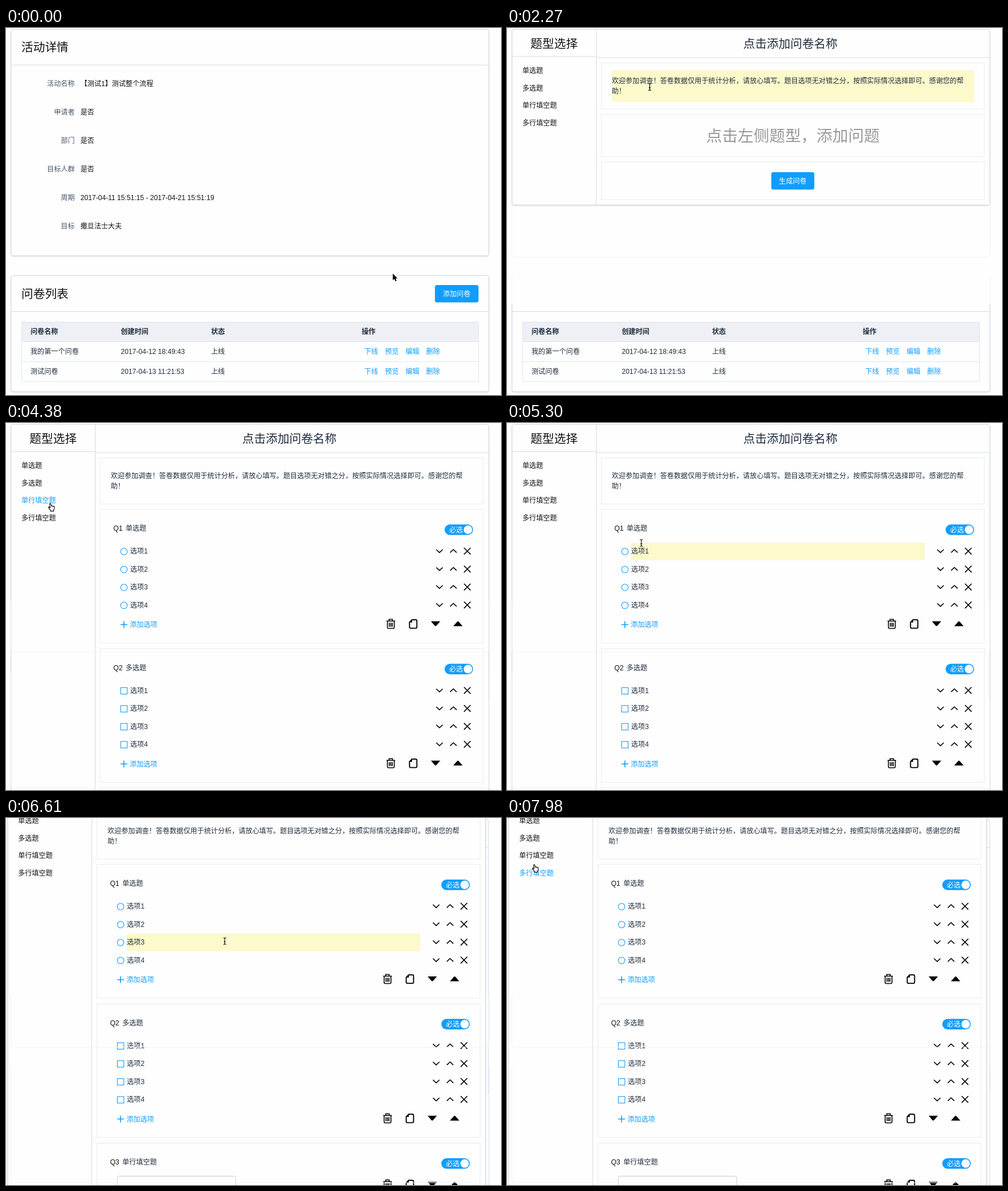
Animation of 869x644 px, one loop 8000 ms. Source, as an HTML page:

```html
<!DOCTYPE html>
<html lang="zh-CN">
<head>
<meta charset="utf-8">
<title>问卷编辑</title>
<style>
html, body { margin: 0; width: 100%; height: 100%; overflow: hidden; background: #fefefe; }
svg { display: block; width: 869px; height: 644px; }
text { font-family: "Liberation Sans", "Noto Sans CJK SC", "Noto Sans CJK", sans-serif; white-space: pre; }
.card { fill: #fefefe; stroke: #d1dbe5; filter: drop-shadow(0 1.5px 1.5px rgba(0,0,0,.14)); }
.line { fill: none; stroke: #d3dce6; }
.box { fill: none; stroke: #ececec; }
.ghost { fill: none; stroke: #f1f2f3; }
.ink { fill: none; stroke: #000; stroke-width: 1.6; }
.blue { fill: none; stroke: #109dff; stroke-width: 1.1; }
</style>
</head>
<body>
<svg id="stage" viewBox="0 0 869 644" xmlns="http://www.w3.org/2000/svg"></svg>
<script>
const LOOP = 8000, BLUE = '#109dff', DARK = '#1f2d3d', GREY = '#48576a', SMALL = 12.12, BIG = 20.7;
const QUESTION_STEP = 244.5, ROW_STEP = 31.5;

// y is the visual middle of the text
const text = (x, y, s, fill = DARK, size = SMALL, more = '') =>
  `<text x="${x}" y="${y + size * 0.37}" font-size="${size}" fill="${fill}" ${more}>${s}</text>`;
const middle = (x, y, s, fill, size) => text(x, y, s, fill, size, 'text-anchor="middle"');
const rect = (x, y, w, h, more) => `<rect x="${x}" y="${y}" width="${w}" height="${h}" ${more}/>`;
const path = (d, cls, more = '') => `<path d="${d}" class="${cls}" ${more}/>`;
const group = (id, body, more = '') => `<g id="${id}" ${more}>${body}</g>`;
const button = (id, x, y, w, label) =>
  rect(x, y, w, 30.5, `rx="3.5" fill="${BLUE}" id="${id}"`) + middle(x + w / 2, y + 15.5, label, '#fff');

function listPage() {
  const fields = [
    ['活动名称', '【测试1】测试整个流程'], ['申请者', '是否'], ['部门', '是否'], ['目标人群', '是否'],
    ['周期', '2017-04-11 15:51:15 - 2017-04-21 15:51:19'], ['目标', '撒旦法士大夫']
  ];
  const rows = [['我的第一个问卷', '2017-04-12 18:49:43'], ['测试问卷', '2017-04-13 11:21:53']];
  const columns = [43, 201.5, 360, 624.5];
  let s = rect(9, 2.5, 838.5, 397, 'rx="3.5" class="card"') + path('M9 65H847.5', 'line') +
    text(27, 33, '活动详情', '#111', BIG);
  fields.forEach(([name, value], i) => {
    const y = 98 + i * 49.9;
    s += text(120.5, y, name, GREY, SMALL, 'text-anchor="end"') + text(130.7, y, value, '#111');
  });
  s += rect(9, 434.5, 838.5, 203.5, 'rx="3.5" class="card"') + path('M9 497.5H847.5', 'line') +
    text(27, 466, '问卷列表', '#111', BIG) + button('add', 753, 451, 76.5, '添加问卷') +
    rect(27, 516, 802.5, 34.5, 'fill="#eef0f6"') +
    path('M27.5 516H829.5V620H27.5ZM27 550.5H829.5M27 585.5H829.5', 'line', 'style="stroke:#dfe6ec"');
  ['问卷名称', '创建时间', '状态', '操作'].forEach((h, i) => {
    s += text(columns[i], 533, h, DARK, SMALL, 'font-weight="bold"');
  });
  rows.forEach((row, i) => {
    const y = 567.5 + i * 35;
    [...row, '上线'].forEach((v, k) => { s += text(columns[k], y, v); });
    ['下线', '预览', '编辑', '删除'].forEach((v, k) => { s += text(629 + k * 36.2, y + 0.5, v, BLUE); });
  });
  return s;
}

const tools = y => `<g transform="translate(0 ${y})">` +
  path('M668 -5H683.2M672.5 -5V-8H678.5V-5M669.6 -5V6q0 2 2 2h8q2 0 2-2V-5M673 -2V5M675.6 -2V5M678.2 -2V5', 'ink') +
  path('M712.8 -7.3H719.3q2 0 2 2V5.6q0 2-2 2H710.4q-2 0-2-2V-2.8Z', 'ink', 'style="stroke-width:1.9"') +
  '<path d="M708.4 -2.5L713 -7.5V-2.5ZM746 -4.5H762.3L755.5 3.2Q754.1 4.6 752.7 3.2ZM785.2 4H801.6L794.8 -3.7Q793.4 -5.1 792 -3.7Z"/></g>';

const header = (n, kind) => text(188.5, 185, 'Q' + n, '#111') + text(210, 185, kind) +
  rect(770, 178, 50, 18.5, `rx="9.25" fill="${BLUE}"`) + text(778, 187.3, '必选', '#fff') +
  '<circle cx="811" cy="187.2" r="7.5" fill="#fff"/>';

function choice(n, kind, mark) {
  let s = rect(165.5, 151.5, 672.5, 234.5, 'class="box"') + header(n, kind);
  for (let i = 0; i < 4; i++) {
    const y = 225 + i * ROW_STEP;
    s += mark(y + 0.5) + text(218, y, '选项' + (i + 1)) +
      path(`M755.3 ${y - 3}L761 ${y + 2.3}L766.7 ${y - 3}M779.7 ${y + 2.3}L785.4 ${y - 3}L791.1 ${y + 2.3}` +
        `M804 ${y - 6}l11.6 11.6m0 -11.6l-11.6 11.6`, 'ink');
  }
  return s + path('M201 353.7H213M207 347.7V359.7', 'blue', 'style="stroke-width:1.6"') +
    text(217.3, 354, '添加选项', BLUE) + tools(352.5);
}

function editor() {
  const kinds = ['单选题', '多选题', '单行填空题', '多行填空题'];
  const radio = y => `<circle cx="207" cy="${y}" r="5.8" class="blue"/>`;
  const check = y => rect(201.3, y - 5.7, 11.4, 11.4, 'class="blue"');
  const shift = k => `transform="translate(0 ${k * QUESTION_STEP})"`;
  return rect(9, 2.5, 838.5, 308, 'rx="3.5" class="card" id="panel"') +
    rect(0, 0, 0, 0, 'fill="#fcf9cb" id="glow"') +
    path('', 'line', 'id="divider"') +
    middle(82.7, 27, '题型选择', '#111', BIG) + middle(497.5, 27.5, '点击添加问卷名称', DARK, BIG) +
    kinds.map((k, i) => text(27, 74.5 + i * 30.7, k, '#111', SMALL, `id="item${i}"`)).join('') +
    rect(165.5, 61.5, 672.5, 80.5, 'class="box"') +
    text(184, 92.7, '欢迎参加调查！答卷数据仅用于统计分析，请放心填写。题目选项无对错之分，按照实际情况选择即可。感谢您的帮') +
    text(184, 110.7, '助！') +
    group('empty', rect(165.5, 151.5, 672.5, 74, 'class="box"') + middle(502, 189, '点击左侧题型，添加问题', '#999', 27.7)) +
    group('q1', choice(1, kinds[0], radio)) +
    group('q2', choice(2, kinds[1], check), shift(1)) +
    group('q3', rect(165.5, 151.5, 672.5, 106, 'class="box"') + header(3, kinds[2]) +
      rect(201, 209.5, 208, 31, 'rx="3" fill="#fff" stroke="#c0ccda"') + tools(224), shift(2)) +
    group('submit', rect(165.5, 235, 672.5, 66, 'class="box"') + button('create', 464, 253, 75.5, '生成问卷'));
}

const edge = 'stroke="#fff" stroke-width="1" stroke-linejoin="round" paint-order="stroke"';
const cursors = {
  arrow: `<path d="M0 0V11.6L2.7 9.2L4.6 13.4L6.7 12.5L4.9 8.4H8.4Z" ${edge}/>`,
  hand: '<path transform="translate(-3.6 0)" d="M2.6 1.6c0-1.6 2.2-1.6 2.4 0L5.6 5c.3-1 1.9-.9 2 .2 .4-.9 1.7-.6 1.8.4 .5-.7 1.5-.3 1.5.7l-.2 3.4-1.2 2.3v1.6H4.2v-1.4L.6 7.6c-.6-1 .7-2 1.6-1L3.6 8z" fill="#fff" stroke="#000" stroke-width="1.1" stroke-linejoin="round"/>',
  beam: '<path d="M-2.6 -6q2.6 0 2.6 1.4q0 -1.4 2.6 -1.4M0 -4.6V4.6M-2.6 6q2.6 0 2.6 -1.4q0 1.4 2.6 1.4M-1.6 1.5H1.6" fill="none" stroke="#000" stroke-width="1.1"/>'
};

document.getElementById('stage').innerHTML =
  '<clipPath id="lower"><rect y="484" width="869" height="160"/></clipPath>' +
  group('list', listPage()) +
  path('M842 2.5H844q3.5 0 3.5 3.5V644M841 52H847.5', 'line', 'id="trace"') +
  group('editor', editor()) +
  path('M8.5 312V398q0 4 4 4H844q4 0 4-4V312M8.5 436V484M848.5 436V484', 'ghost', 'id="ghost"') +
  path('M8.5 484V637q0 3 3 3H845q3 0 3-3V484', 'ghost', 'id="ghost2"') +
  group('cursor', Object.entries(cursors).map(([k, v]) => group(k, v)).join(''));

const el = id => document.getElementById(id);
const set = (id, attrs) => { for (const k in attrs) el(id).setAttribute(k, attrs[k]); };
const show = (id, on) => { el(id).style.display = on ? '' : 'none'; };

// time, x, y of the pointer's hot spot
const track = [
  [0, 679, 431], [349, 679, 431], [350, 675.5, 434], [490, 675.5, 434], [680, 628, 446], [960, 767.6, 469],
  [1559, 767.6, 469], [1560, 766, 469], [1640, 766, 469], [1700, 715, 428], [1960, 600, 220], [2220, 300, 110],
  [2450, 77, 80], [2510, 76, 76], [2620, 71, 78], [2800, 71, 78], [3120, 114.6, 97], [3580, 199, 154],
  [3670, 190, 150], [3910, 75, 100], [4210, 75, 100], [4380, 77.6, 141], [4600, 77.6, 141], [5000, 260, 222],
  [5200, 260, 222], [5940, 82.6, 137.5], [6229, 82.6, 137.5], [6230, 384, 216], [6940, 384, 216],
  [7300, 330, 100], [7690, 215, 45], [7750, 130, 60], [7980, 47.6, 81.5], [8000, 47.6, 81.5]
];

function pointer(t) {
  const i = Math.max(1, track.findIndex(k => k[0] > t));
  const [a, b] = [track[i - 1], track[i]];
  const u = (t - a[0]) / (b[0] - a[0]);
  return [a[1] + (b[1] - a[1]) * u, a[2] + (b[2] - a[2]) * u];
}

const passed = (t, times) => times.filter(k => t >= k).length;

// editable area under the point, as [x, y, w, h]
function editable(x, y, n) {
  const areas = [[184, 74, 636, 56]];
  for (let q = 0; q < Math.min(n, 2); q++)
    for (let i = 0; i < 4; i++) areas.push([218, 210 + q * QUESTION_STEP + i * ROW_STEP, 515, 30.5]);
  return areas.find(([ax, ay, w, h]) => x >= ax && x <= ax + w && y >= ay && y <= ay + h);
}

function draw(t) {
  const editing = t >= 1260, n = passed(t, [2800, 4210, 6170]);
  const dx = n > 2 ? -5.8 : 0;
  const scroll = [0, 18, 45, 62, 70][passed(t, [6380, 6460, 6530, 6610])];
  const [x, y] = pointer(t), ex = x - dx, ey = y + scroll;
  let kind = 'arrow';

  show('list', n < 2);
  if (editing) set('list', { 'clip-path': 'url(#lower)' });
  else el('list').removeAttribute('clip-path');
  show('editor', editing);
  show('ghost', editing);
  show('ghost2', n > 1);
  show('trace', n > 2);

  if (editing) {
    const grow = [0, 160.5, 405, 520][n], bottom = 310.5 + grow;
    set('editor', { transform: `translate(${dx} ${-scroll})` });
    set('panel', { height: bottom - 2.5 });
    set('divider', { d: `M9 50H156.5M156.5 2.5V${bottom}M156.5 52H847.5` });
    set('submit', { transform: `translate(0 ${grow})` });
    show('empty', !n);
    for (let q = 1; q < 4; q++) show('q' + q, n >= q);

    const inMenu = ex > 9 && ex < 156;
    const hot = inMenu ? Math.floor((ey - 58.5) / 30.7) : -1;
    for (let i = 0; i < 4; i++) set('item' + i, { fill: i === hot ? BLUE : '#111' });
    const area = editable(ex, ey, n);
    show('glow', area);
    if (area) set('glow', { x: area[0], y: area[1], width: area[2], height: area[3] });
    if (area) kind = 'beam';
    else if ((hot >= 0 && hot < 4) || t < 1560) kind = 'hand';
  } else {
    const over = x > 753 && x < 829 && y > 451 && y < 482;
    set('add', { fill: over ? '#45b2ff' : BLUE });
    if (over) kind = 'hand';
  }
  for (const k in cursors) show(k, k === kind);
  set('cursor', { transform: `translate(${x} ${y})` });
}

const start = performance.now();
function tick() {
  draw((performance.now() - start) % LOOP);
  requestAnimationFrame(tick);
}
tick();
</script>
</body>
</html>
```
